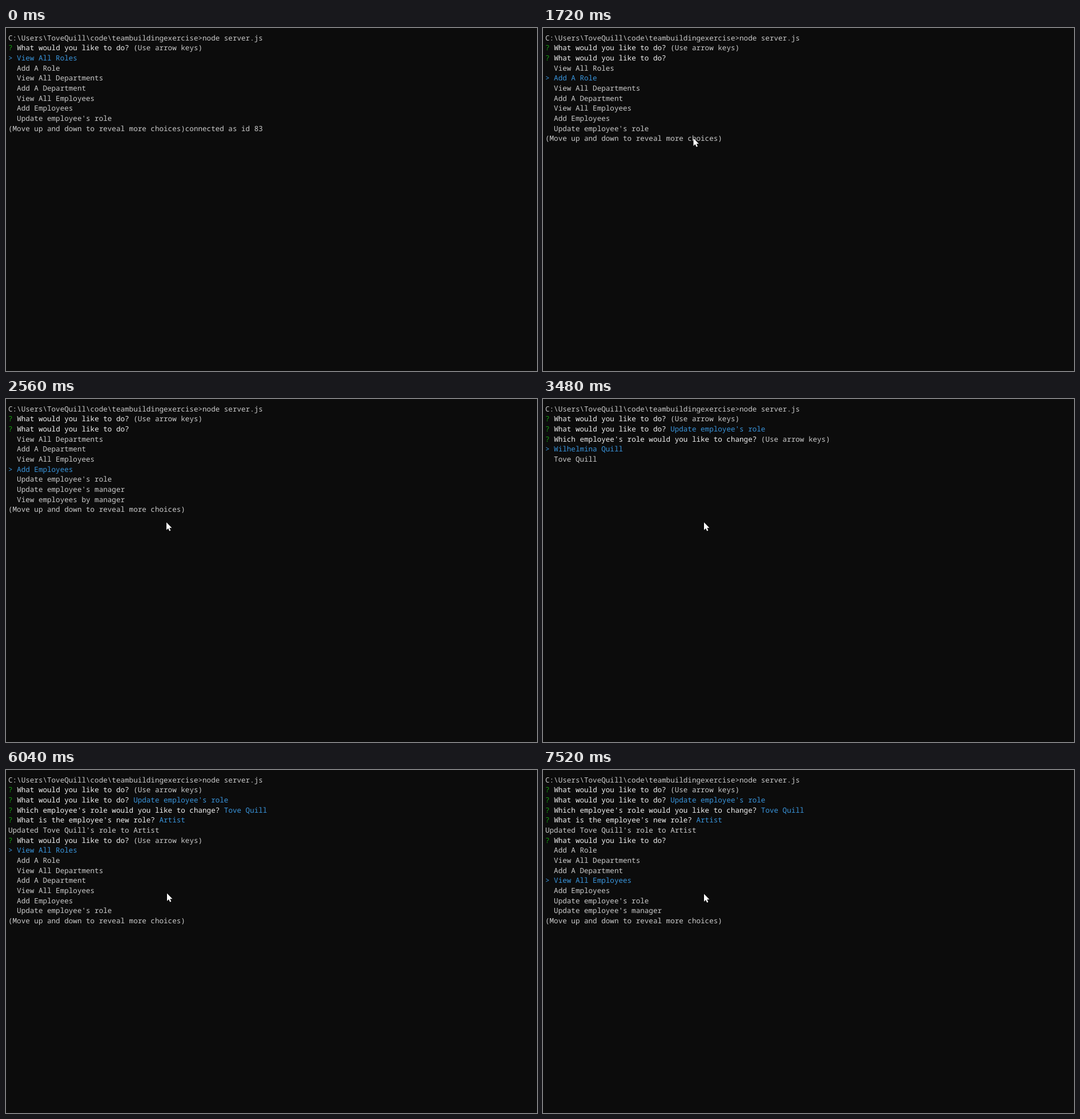
Recreate the animation shown at these times as an HTML page. Size 930 px wide and 602 px high, loop 8000 ms.

```html
<!DOCTYPE html>
<html lang="en">
<head>
<meta charset="utf-8">
<title>Terminal menu</title>
<style>
  html, body { margin: 0; width: 100%; height: 100%; overflow: hidden; background: #0c0c0c; }
  svg { display: block; width: 930px; height: 602px; background: #0c0c0c; }
  text {
    font: 12.6px "Noto Sans Mono", "DejaVu Sans Mono", monospace;
    font-variant-ligatures: none;
    text-rendering: geometricPrecision;
    white-space: pre;
    fill: #cccccc;
  }
  .mark { fill: #13a10e; }
  .ask { fill: #f2f2f2; font-weight: 500; }
  .pick { fill: #3a96dd; }
  #mouse { fill: #fff; stroke: #000; stroke-width: 1; paint-order: stroke; }
</style>
</head>
<body>
<svg viewBox="0 0 930 602">
  <g id="screen"></g>
  <path id="mouse" d="M0 0V13.4L3.1 10.6L5.2 15.3L7.4 14.3L5.3 9.7H9.5Z"/>
</svg>
<script>
const LOOP = 8000, LEFT = 4, BASE = 21.8, PITCH = 17.65;
const NS = "http://www.w3.org/2000/svg";
const screen = document.getElementById("screen");
const mouse = document.getElementById("mouse");

const KEYS = "(Use arrow keys)";
const MORE = "(Move up and down to reveal more choices)";
const TODO = "What would you like to do?";
const WHICH = "Which employee's role would you like to change?";
const ROLE = "What is the employee's new role?";
const UPDATE = "Update employee's role";
const PERSON = "Tove Quill";
const PEOPLE = ["Wilhelmina Quill", PERSON];
const ROLES = ["Artist", "Full-Stack Developer"];
const ACTIONS = [
  "View All Roles", "Add A Role", "View All Departments", "Add A Department",
  "View All Employees", "Add Employees", UPDATE, "Update employee's manager",
  "View employees by manager", "Exit"
];

// A line is a list of [class, text] runs.
const plain = text => [["", text]];
const ask = (question, hint = "") => [["mark", "? "], ["ask", question], ["", hint && " " + hint]];
const answer = (question, choice) => [...ask(question), ["pick", " " + choice]];
const list = (items, chosen) => items.map((item, i) =>
  i === chosen ? [["pick", "> " + item]] : plain("  " + item));

// The pointer stops at the fourth row; from there the list scrolls.
function menu(chosen, note = "") {
  const first = Math.max(0, chosen - 3);
  return [...list(ACTIONS.slice(first, first + 7), chosen - first), plain(MORE + note)];
}

const intro = [plain("C:\\Users\\ToveQuill\\code\\teambuildingexercise>node server.js"), ask(TODO, KEYS)];
const chosenAction = [...intro, answer(TODO, UPDATE)];
const chosenPerson = [...chosenAction, answer(WHICH, PERSON)];
const done = [...chosenPerson, answer(ROLE, ROLES[0]), plain(`Updated ${PERSON}'s role to ${ROLES[0]}`)];
const browse = chosen => [...intro, ask(TODO), ...menu(chosen)];
const again = (chosen, hint) => [...done, ask(TODO, hint), ...menu(chosen)];

const scenes = [
  [0, [...intro, ...menu(0, "connected as id 83")]],
  [1720, browse(1)],
  [1950, browse(2)],
  [2180, browse(3)],
  [2330, browse(4)],
  [2560, browse(5)],
  [2790, browse(6)],
  [3480, [...chosenAction, ask(WHICH, KEYS), ...list(PEOPLE, 0)]],
  [4490, [...chosenAction, ask(WHICH), ...list(PEOPLE, 1)]],
  [4720, [...chosenPerson, ask(ROLE, KEYS), ...list(ROLES, 0)]],
  [6040, again(0, KEYS)],
  [6650, again(1)],
  [6820, again(2)],
  [6970, again(3)],
  [7520, again(4)]
];

// Pointer positions: time, x, y. Each holds until the next.
const stops = [
  [0, -50, -50],
  [70, 755, 543], [150, 680, 444], [220, 612, 352], [300, 577, 308],
  [470, 580, 306.5], [540, 582, 305.5],
  [1090, 480, 262], [1170, 340, 202], [1250, 230, 160], [1320, 197, 151], [1400, 253, 183],
  [1550, 263, 189], [1720, 263.5, 193.5], [1800, 270, 204], [1870, 277, 212.5], [1950, 281, 216.5],
  [2870, 282, 216.5], [7290, 282, 217.5]
];

const latest = (steps, t) => steps.findLast(step => step[0] <= t);

function add(parent, tag, attrs, text = "") {
  const node = document.createElementNS(NS, tag);
  for (const name in attrs) node.setAttribute(name, attrs[name]);
  node.textContent = text;
  parent.append(node);
  return node;
}

function write(lines) {
  screen.replaceChildren();
  lines.forEach((runs, row) => {
    const line = add(screen, "text", { x: LEFT, y: BASE + row * PITCH });
    for (const [kind, text] of runs) if (text) add(line, "tspan", { class: kind }, text);
  });
}

let shown;
function draw(t) {
  const lines = latest(scenes, t)[1];
  if (lines !== shown) write(shown = lines);
  const [, x, y] = latest(stops, t);
  mouse.setAttribute("transform", `translate(${x} ${y})`);
}

const start = performance.now();
function tick() {
  draw((performance.now() - start) % LOOP);
  requestAnimationFrame(tick);
}
tick();
</script>
</body>
</html>
```
